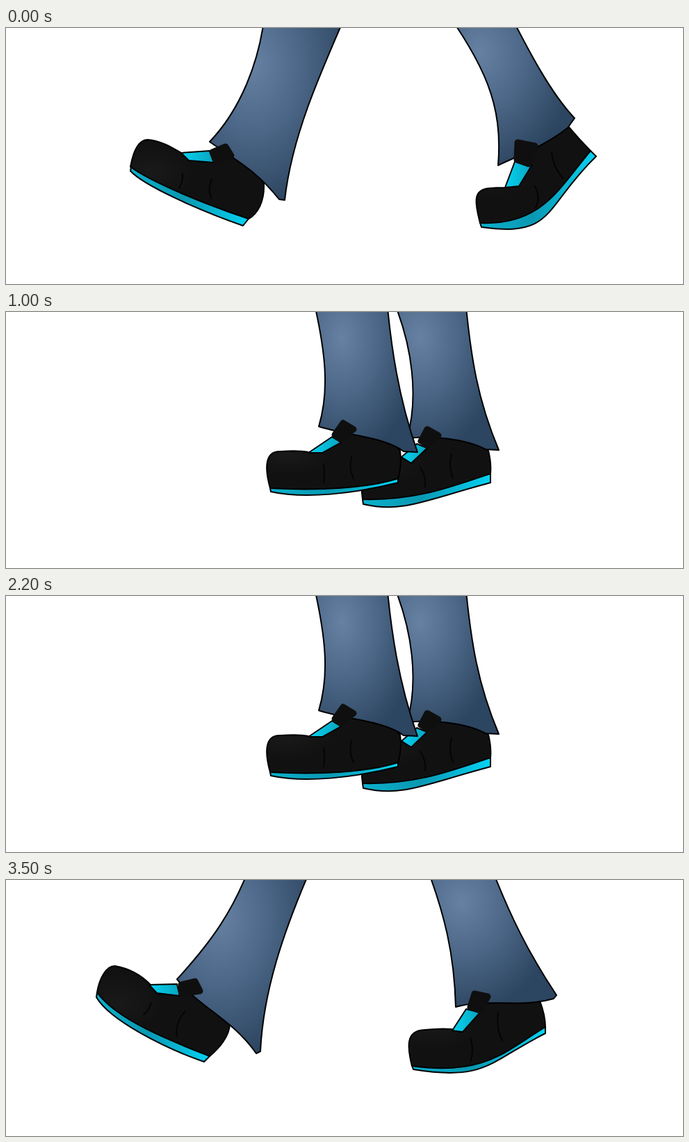
Recreate the animation shown at these times as an HTML page. Size 974 px wide and 369 px high, loop 3600 ms.

```html
<!DOCTYPE html>
<html lang="en">
<head>
<meta charset="utf-8">
<title>Walking legs</title>
<style>
  html, body { margin: 0; width: 100%; height: 100%; overflow: hidden; background: #fff; }
  svg { display: block; width: 100%; height: 100%; }
  path { stroke: #000; stroke-width: 2; stroke-linejoin: round; stroke-linecap: round; }
  .pants { fill: url(#denim); }
  .sole { fill: url(#rubber); }
  .body { fill: url(#leather); }
  .panel { fill: url(#cloth); }
  .strap { fill: #0f0f0f; stroke: #0f0f0f; stroke-width: 9; }
  .crease { fill: none; stroke: #050505; }
</style>
</head>
<body>
<svg viewBox="0 0 974 369">
  <defs>
    <radialGradient id="denim" cx=".3" cy=".32" r=".72">
      <stop offset="0" stop-color="#6681a2"/>
      <stop offset=".5" stop-color="#4a6585"/>
      <stop offset="1" stop-color="#2c4560"/>
    </radialGradient>
    <linearGradient id="rubber">
      <stop offset="0" stop-color="#0cb0cc"/>
      <stop offset=".45" stop-color="#0a98b2"/>
      <stop offset="1" stop-color="#06d2f2"/>
    </linearGradient>
    <linearGradient id="cloth">
      <stop offset="0" stop-color="#04d4f2"/>
      <stop offset="1" stop-color="#09a3be"/>
    </linearGradient>
    <radialGradient id="leather" cx=".15" cy=".4" r=".35">
      <stop offset="0" stop-color="#191919"/>
      <stop offset="1" stop-color="#111"/>
    </radialGradient>
  </defs>
  <g id="far"></g>
  <g id="near"></g>
</svg>
<script>
const STEP = 100, PHASES = 12;
const LAYERS = ['sole', 'body', 'panel', 'crease', 'pants', 'strap'];

// Key poses; every part keeps the same point order so poses can be blended.
const strikeNear = {
  pants: 'M374,-40 C368,52 333,122 293,164 C330,190 360,205 393,247 L401,248 C411,158 448,74 498,-40',
  sole: 'M179,206 C198,227 278,263 341,285 L349,275 180,200Z',
  body: 'M179,200 C183,178 190,161 204,161 C225,163 240,173 252,180 L263,191 300,190 C325,165 365,205 371,225 C372,250 362,268 349,275 C300,259 211,224 179,200Z',
  panel: 'M252,180 293,177 299,194 263,191Z',
  strap: 'M297,179 316,171 324,184 302,192Z',
  crease: 'M254,210 Q255,222 249,231 M296,218 Q289,233 296,246'
};
const strikeFar = {
  pants: 'M397,-40 C370,60 340,125 299,172 C335,195 380,220 420,268 L429,271 C433,170 465,80 497,-40',
  sole: 'M193,214 C210,240 300,275 352,293 L359,288 192,208Z',
  body: 'M192,208 C195,185 204,168 220,167 C240,169 255,178 266,188 L275,203 315,202 C340,180 375,215 386,238 C385,255 375,275 359,287 C312,270 235,243 192,208Z',
  panel: 'M266,190 305,184 312,202 275,203Z',
  strap: 'M310,184 332,178 339,193 314,198Z',
  crease: 'M276,218 Q278,230 272,238 M316,220 Q302,235 303,251'
};
const stance = {
  pants: 'M547,-40 C590,50 592,130 577,182 C610,178 660,182 690,198 L709,199 C680,130 668,70 659,-40',
  sole: 'M514,277 C570,290 600,272 697,246 L697,233 513,270Z',
  body: 'M513,270 C509,235 508,208 535,208 C545,207 558,208 568,209 L583,217 608,190 C625,170 675,178 694,200 C697,212 698,222 697,233 C640,252 590,272 513,270Z',
  panel: 'M569,209 591,190 606,196 583,218Z',
  strap: 'M597,186 606,169 622,178 607,192Z',
  crease: 'M596,224 Q605,238 603,252 M641,205 Q636,223 643,240'
};
const heelUp = {
  pants: 'M597,-40 C633,50 645,110 647,183 C690,170 740,185 788,171 L792,166 C755,110 725,55 690,-40',
  sole: 'M586,273 C690,290 695,262 776,221 L776,212 584,268Z',
  body: 'M584,268 C577,240 575,217 602,216 C620,214 632,214 642,215 L655,219 683,186 C700,165 745,165 768,174 C774,190 776,200 776,212 C720,245 690,283 584,268Z',
  panel: 'M642,217 662,186 682,191 657,219Z',
  strap: 'M668,183 674,164 693,168 682,188Z',
  crease: 'M708,190 Q705,215 714,232 M668,228 Q674,245 668,262'
};
const pushNear = {
  pants: 'M632,-40 C675,70 685,120 690,200 C740,180 765,150 830,143 L831,138 C795,95 770,35 742,-40',
  sole: 'M663,269 C775,297 765,266 841,190 L838,179 661,264Z',
  body: 'M661,264 C656,235 656,215 685,214 C700,212 708,212 715,213 L719,218 742,180 C765,150 795,140 818,143 C828,155 836,168 838,179 C793,235 755,285 661,264Z',
  panel: 'M715,212 724,187 742,186 730,215Z',
  strap: 'M727,162 746,160 740,184 727,184Z',
  crease: 'M780,183 Q778,203 788,215 M745,225 Q750,240 742,252'
};
const pushFar = {
  pants: 'M622,-40 C690,55 715,110 708,198 C735,185 775,170 808,144 L818,130 C785,95 755,40 715,-40',
  sole: 'M684,287 C790,302 772,260 849,185 L841,177 682,281Z',
  body: 'M682,281 C674,250 672,233 695,231 C705,230 712,230 718,230 L738,227 752,190 C765,165 790,145 810,143 C820,155 832,168 841,177 C795,232 770,285 682,281Z',
  panel: 'M718,230 733,190 757,197 738,228Z',
  strap: 'M736,165 761,170 752,196 735,190Z',
  crease: 'M785,180 Q788,203 802,217 M760,227 Q770,243 762,259'
};
const passing = {
  pants: 'M437,-40 C462,60 465,115 450,165 C490,178 545,180 572,201 L592,202 C565,125 553,50 546,-40',
  sole: 'M381,259 C430,270 500,262 564,246 L564,240 380,254Z',
  body: 'M380,254 C372,225 372,200 395,201 C410,200 425,200 435,202 L455,203 483,183 C505,165 545,175 567,200 C569,215 567,230 564,240 C520,254 450,258 380,254Z',
  panel: 'M435,203 469,180 482,188 455,203Z',
  strap: 'M473,177 485,160 500,169 481,183Z',
  crease: 'M457,219 Q459,233 457,246 M497,209 Q493,225 500,240'
};
const reach = {
  pants: 'M358,-40 C330,45 290,95 246,143 C280,185 325,200 360,250 L366,247 C370,165 395,80 449,-40',
  sole: 'M130,169 C150,203 230,243 285,262 L293,254 131,162Z',
  body: 'M131,162 C134,143 144,123 157,124 C180,128 195,138 207,150 L217,164 255,166 C275,155 310,180 322,207 C322,225 306,243 293,254 C245,235 160,203 131,162Z',
  panel: 'M206,151 246,150 250,167 217,163Z',
  strap: 'M252,151 272,146 279,160 253,164Z',
  crease: 'M209,177 Q206,188 198,194 M258,189 Q243,205 246,225'
};

const PAIR = /(-?[\d.]+),(-?[\d.]+)/g;
const points = path => [...path.matchAll(PAIR)].map(m => [+m[1], +m[2]]);
const mapPath = (path, fn) => {
  let i = 0;
  return path.replace(PAIR, (_, x, y) => fn([+x, +y], i++).map(v => v.toFixed(1)).join(','));
};
const mix = (a, b, t) => a + (b - a) * t;

function rotator([cx, cy], degrees) {
  const a = degrees * Math.PI / 180, c = Math.cos(a), s = Math.sin(a);
  return ([x, y]) => [cx + (x - cx) * c - (y - cy) * s, cy + (x - cx) * s + (y - cy) * c];
}

// Blend two poses; foot turns the shoe at the ankle, lean turns the leg at the toe.
function blend(a, b, t, { dx = 0, dy = 0, foot = 0, lean = 0 }) {
  const mixed = {};
  for (const part of LAYERS) {
    const ends = points(b[part]);
    mixed[part] = mapPath(a[part], ([x, y], i) => [mix(x, ends[i][0], t), mix(y, ends[i][1], t)]);
  }
  const turnFoot = rotator(points(mixed.strap)[2], foot);
  const turnLeg = rotator(points(mixed.sole)[0], lean);
  for (const part of LAYERS) {
    mixed[part] = mapPath(mixed[part], p => {
      const [x, y] = turnLeg(part === 'pants' ? p : turnFoot(p));
      return [x + dx, y + dy];
    });
  }
  return mixed;
}

const walk = (strike, push) => [
  strike,
  blend(strike, stance, .25, { dy: 22, foot: -14 }),
  blend(strike, stance, .5, { dy: 16, foot: -8 }),
  blend(strike, stance, .75, { dy: 9, foot: -1 }),
  stance,
  heelUp,
  push,
  blend(push, passing, 0, { dx: 72, dy: -3, lean: -13 }),
  blend(push, passing, .4, { dx: 95, dy: -12, lean: -22 }),
  blend(push, passing, .75, { dx: 45, dy: -5, lean: -12 }),
  passing,
  reach
];

function makeLeg(id, poses, offset) {
  const group = document.getElementById(id);
  const paths = LAYERS.map(part => {
    const path = document.createElementNS('http://www.w3.org/2000/svg', 'path');
    path.setAttribute('class', part);
    group.append(path);
    return path;
  });
  return phase => {
    const pose = poses[(phase + offset) % PHASES];
    LAYERS.forEach((part, i) => paths[i].setAttribute('d', pose[part]));
  };
}

const legs = [
  makeLeg('far', walk(strikeFar, pushFar), PHASES / 2),
  makeLeg('near', walk(strikeNear, pushNear), 0)
];

function draw(now) {
  const phase = Math.floor(now / STEP) % PHASES;
  legs.forEach(show => show(phase));
}

function tick(now) {
  draw(now);
  requestAnimationFrame(tick);
}
draw(0);
requestAnimationFrame(tick);
</script>
</body>
</html>
```
